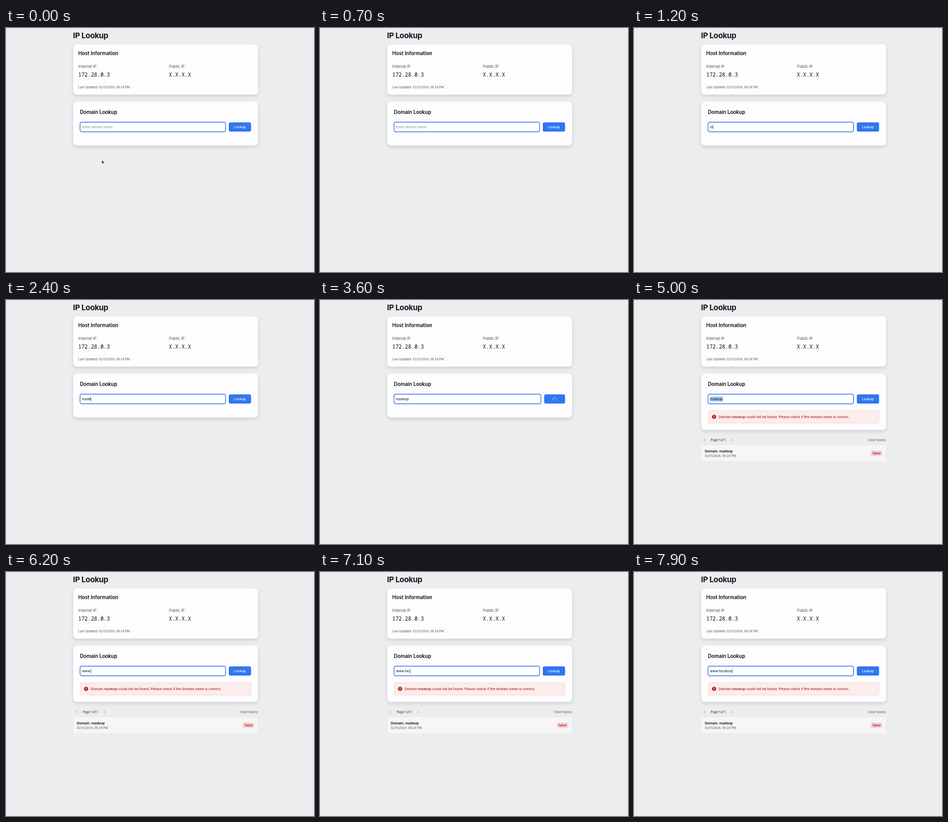
These frames come from a looping animation (600 px wide and 477 px high, 8 s). An HTML page with a canvas:

```html
<!DOCTYPE html>
<html lang="en">
<head>
<meta charset="utf-8">
<title>IP Lookup</title>
<style>
  html, body { margin: 0; width: 100%; height: 100%; overflow: hidden; background: #ebedee; }
  canvas { display: block; width: 600px; height: 477px; }
</style>
</head>
<body>
<canvas id="stage"></canvas>
<script>
const W = 600, H = 477, LOOP = 8000;
const SANS = 'Inter, "Open Sans", sans-serif';
const MONO = '"Noto Sans Mono", "DejaVu Sans Mono", monospace';
const INK = '#0b0b10', GREY = '#52555c', BLUE = '#2f76f1', RED = '#b3231f', CARD = '#fdfcfe';

const POINTER_HIDES = 200, SUBMIT = 3300, RESULT = 3700, SELECT = 4800;
const BLINK = 400;

// Each key press: time, text in the field afterwards
const presses = [];
const type = (text, times) => times.forEach((t, i) => presses.push([t, text.slice(0, i + 1)]));
type('madeup', [1000, 1500, 1800, 2200, 2700, 3100]);
type('www.faceboo', [5200, 5400, 5700, 6000, 6600, 6800, 7000, 7200, 7400, 7600, 7800]);

const canvas = document.getElementById('stage');
const ctx = canvas.getContext('2d');
const dpr = window.devicePixelRatio || 1;
canvas.width = Math.round(W * dpr);
canvas.height = Math.round(H * dpr);

function box(x, y, w, h, r, fill, stroke, line = 1) {
  ctx.beginPath();
  ctx.roundRect(x, y, w, h, r);
  if (fill) { ctx.fillStyle = fill; ctx.fill(); }
  if (stroke) { ctx.strokeStyle = stroke; ctx.lineWidth = line; ctx.stroke(); }
}

// Draws text and returns the x where it ends
function text(str, x, y, size, weight, color, { family = SANS, align = 'left', spacing = 0 } = {}) {
  ctx.font = `${weight} ${size}px ${family}`;
  ctx.letterSpacing = `${spacing}px`;
  ctx.textAlign = align;
  ctx.fillStyle = color;
  ctx.fillText(str, x, y);
  return x + ctx.measureText(str).width;
}

function path(points, color, width, close) {
  ctx.beginPath();
  points.forEach(([x, y]) => ctx.lineTo(x, y));
  if (close) ctx.closePath();
  ctx.strokeStyle = color;
  ctx.lineWidth = width;
  ctx.lineCap = ctx.lineJoin = 'round';
  ctx.stroke();
}

function card(y, h) {
  ctx.save();
  ctx.shadowColor = 'rgba(0,0,0,0.13)';
  ctx.shadowBlur = 7 * dpr;
  ctx.shadowOffsetY = 3 * dpr;
  box(131, y, 360, h, 7, CARD);
  ctx.restore();
}

function hostCard() {
  card(31.7, 98.5);
  text('Host Information', 140.8, 52.6, 9.65, 600, INK);
  text('Internal IP', 140.8, 77.6, 7.5, 400, GREY);
  text('Public IP', 317.4, 77.6, 7.5, 400, GREY);
  text('172.28.0.3', 140.7, 94.8, 10.3, 500, INK, { family: MONO });
  text('X.X.X.X', 317.2, 94.8, 10.3, 500, INK, { family: MONO });
  text('Last Updated: 02/11/2024, 08:24 PM', 140.9, 118, 5.8, 400, GREY);
}

function spinner(x, y, t) {
  const start = (t - SUBMIT) / 1000 * Math.PI * 2;
  ctx.beginPath();
  ctx.arc(x, y, 3.3, start, start + Math.PI * 1.5);
  ctx.strokeStyle = 'rgba(255,255,255,0.75)';
  ctx.lineWidth = 0.8;
  ctx.stroke();
}

function field(t, busy) {
  const right = busy ? 430.4 : 427.6;
  box(144.3, 184.1, right - 144.3, 18.8, 3.4, '#fff', '#c3d9fb', 2);
  box(144.3, 184.1, right - 144.3, 18.8, 3.4, null, '#3b78d8', 1.1);

  const last = presses.filter(p => p[0] <= t).pop();
  if (!last) {
    text('Enter domain name', 148, 196.2, 6.56, 400, '#85888f');
  } else {
    const [time, value] = last;
    const selected = value === 'madeup' && t >= SELECT;
    ctx.font = `400 6.56px ${SANS}`;
    ctx.letterSpacing = '0px';
    if (selected) box(148, 188.6, ctx.measureText(value).width, 9.8, 0, '#a3c8f5');
    const end = text(value, 148, 196.2, 6.56, 400, INK);
    const submitted = t >= SUBMIT && time < SUBMIT;
    if (!submitted && (t - time) % (BLINK * 2) < BLINK) {
      ctx.fillStyle = INK;
      ctx.fillRect(end, 189.3, 0.6, 8.4);
    }
  }

  const left = busy ? 436.7 : 434.1;
  box(left, 184.5, 477.4 - left, 18, 3, BLUE);
  if (busy) spinner(457, 193.5, t);
  else text('Lookup', 455.7, 196.2, 6.56, 500, '#fff', { align: 'center' });
}

function errorBox() {
  box(144.7, 216.4, 332.5, 24.2, 2.8, '#fcecec', '#f6cccc', 0.7);
  ctx.beginPath();
  ctx.arc(156, 228.4, 4.2, 0, Math.PI * 2);
  ctx.fillStyle = '#c02a26';
  ctx.fill();
  path([[156, 226.2], [156, 228.7]], '#fff', 0.9);
  path([[156, 230.5], [156, 230.51]], '#fff', 1);
  let x = text('Domain ', 165.1, 230.8, 6.62, 500, RED);
  x = text('madeup', x, 230.8, 6.62, 600, RED);
  text(' could not be found. Please check if the domain name is correct.', x, 230.8, 6.62, 500, RED);
}

function history() {
  path([[138.6, 271.2], [136.2, 273.6], [138.6, 276]], '#8b8f96', 0.8);
  path([[190.8, 271.2], [193.2, 273.6], [190.8, 276]], '#8b8f96', 0.8);
  text('Page 1 of 1', 149.6, 275.8, 5.8, 500, '#3d4047');
  text('Clear history', 491, 275.8, 5.8, 400, GREY, { align: 'right' });

  box(131.3, 283.7, 359.4, 32, 1, '#f6f6f7', '#e6e8ea', 0.6);
  text('Domain: madeup', 138, 297.8, 6.65, 600, INK);
  text('02/11/2024, 08:24 PM', 138, 306.6, 5.8, 400, GREY);
  box(461, 294.1, 22.6, 10.8, 2, '#f9d6d7');
  text('failed', 472.3, 301.6, 5.8, 600, '#93282a', { align: 'center' });
}

function pointer(x, y) {
  const shape = [[0, 0], [0, 5.6], [1.3, 4.4], [2.2, 6.4], [3, 6], [2.1, 4.1], [3.8, 4.1]]
    .map(([dx, dy]) => [x + dx, y + dy]);
  path(shape, '#fff', 0.9, true);
  ctx.fillStyle = '#000';
  ctx.fill();
}

function draw(t) {
  ctx.setTransform(dpr, 0, 0, dpr, 0, 0);
  ctx.fillStyle = '#ebedee';
  ctx.fillRect(0, 0, W, H);

  const done = t >= RESULT;
  text('IP Lookup', 130.6, 20.4, 15, 700, '#15171c', { spacing: -0.375 });
  hostCard();
  card(143.8, done ? 110.2 : 86);
  text('Domain Lookup', 144.1, 167.9, 9.65, 600, INK);
  field(t, t >= SUBMIT && !done);
  if (done) {
    errorBox();
    history();
  }
  if (t < POINTER_HIDES) pointer(187, 259);
}

const origin = performance.now();
function tick() {
  draw((performance.now() - origin) % LOOP);
  requestAnimationFrame(tick);
}
tick();
</script>
</body>
</html>
```
